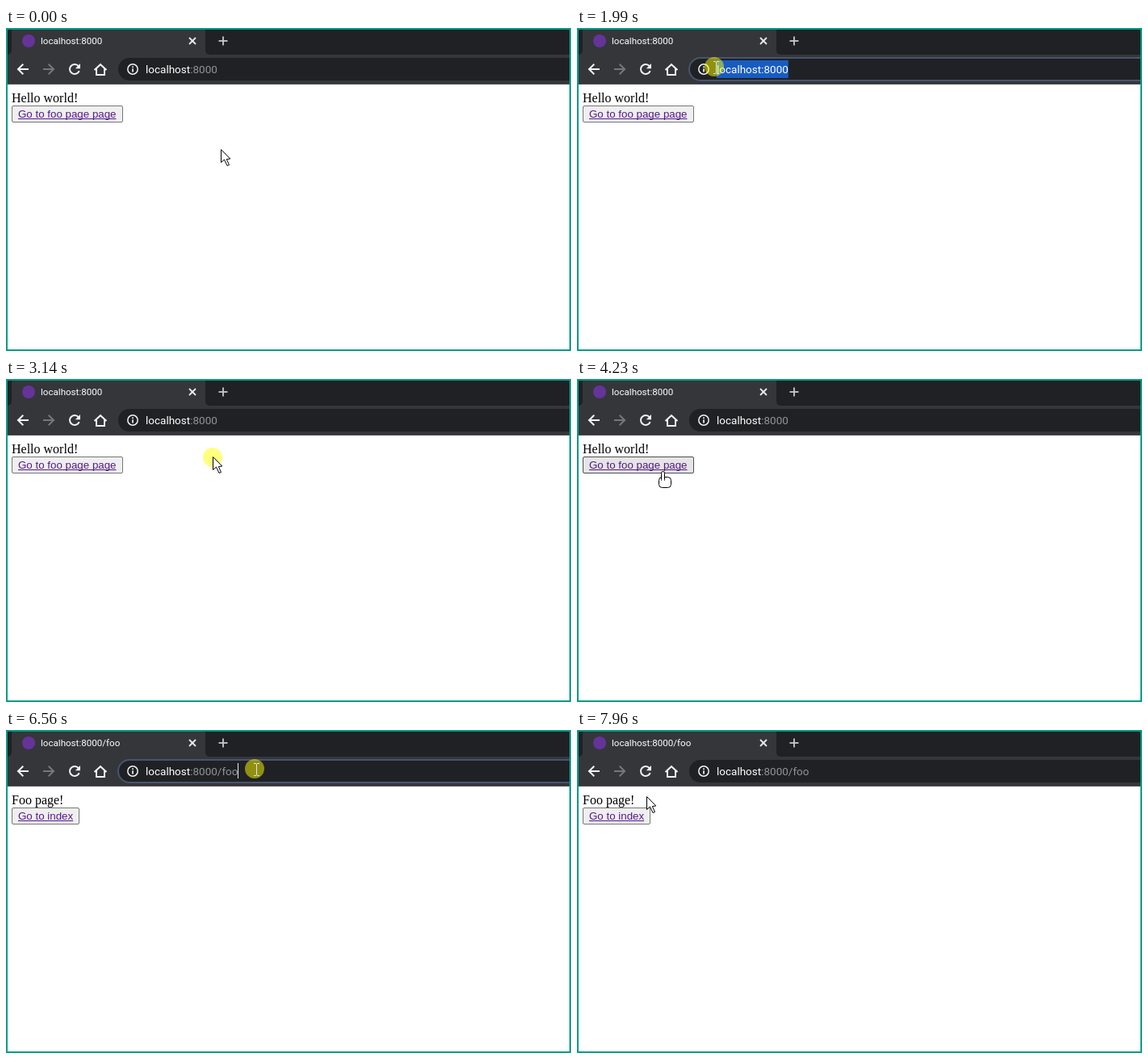
An HTML page with a canvas that plays this animation: 700x400 px, repeating every 8000 ms.

```html
<!DOCTYPE html>
<html lang="en">
<head>
<meta charset="utf-8">
<title>Browser navigation</title>
<style>
  html, body { margin: 0; width: 100%; height: 100%; overflow: hidden; background: #fff; }
  canvas { display: block; }
</style>
</head>
<body>
<canvas id="stage" width="700" height="400"></canvas>
<script>
const ctx = document.getElementById('stage').getContext('2d');
const LOOP = 8000;
const TICK = 77;
const UI = 'Roboto, "Open Sans", sans-serif';
const URL_FONT = '13.5px ' + UI;
const URL_X = 173;
const HOST = 'localhost';
const LIGHT = '#f1f3f4';

// Each move eases from the previous stop; "via" bends the path
const startPoint = [266, 150];
const moves = [
  { start: 530, end: 1070, to: [279, 40] },
  { start: 1150, end: 1220, to: [288, 53] },
  { start: 1370, end: 1760, to: [172, 49] },
  { start: 2140, end: 2290, to: [120, 49] },
  { start: 2370, end: 2910, to: [256, 96], via: [390, 45] },
  { start: 3370, end: 3600, to: [85, 73] },
  { start: 3770, end: 4380, to: [120, 112], via: [60, 125] },
  { start: 4530, end: 4770, to: [110, 110] },
  { start: 5780, end: 6390, to: [310, 49], via: [170, 140] },
  { start: 6630, end: 6860, to: [129, 51] },
  { start: 7030, end: 7560, to: [98, 81], via: [60, 118] },
  { start: 7880, end: 7960, to: [86, 82] }
];
const presses = [[1370, 2370], [3140, 3220], [5000, 5150], [6560, 7030], [7730, 7810]];
const focuses = [[1370, 3140], [6560, 7730]];
const PAGE_CHANGE = 5150;

const within = (ranges, t) => ranges.some(([a, b]) => t >= a && t < b);
const inBox = (p, x, y, w, h) => p.x >= x && p.x < x + w && p.y >= y && p.y < y + h;
const ease = u => u * u * (3 - 2 * u);

function cursorAt(t) {
  const started = moves.filter(m => m.start <= t);
  if (!started.length) return { x: startPoint[0], y: startPoint[1] };
  const { start, end, to, via } = started.pop();
  const from = started.length ? started.pop().to : startPoint;
  const steps = Math.round((end - start) / TICK) + 1;
  const step = Math.floor((t - start + 5) / TICK) + 1;
  const u = ease(Math.min(1, step / steps));
  const [x, y] = [0, 1].map(k => {
    const bend = via ? via[k] : (from[k] + to[k]) / 2;
    return Math.round((1 - u) ** 2 * from[k] + 2 * u * (1 - u) * bend + u * u * to[k]);
  });
  return { x, y };
}

function rect(x, y, w, h, color) {
  ctx.fillStyle = color;
  ctx.fillRect(x, y, w, h);
}

function circle(x, y, r, color) {
  ctx.fillStyle = color;
  ctx.beginPath();
  ctx.arc(x, y, r, 0, Math.PI * 2);
  ctx.fill();
}

function ring(x, y, r, width, turn = [0, Math.PI * 2]) {
  ctx.strokeStyle = LIGHT;
  ctx.lineWidth = width;
  ctx.beginPath();
  ctx.arc(x, y, r, ...turn);
  ctx.stroke();
}

function trace(points, close) {
  ctx.beginPath();
  points.forEach(([x, y]) => ctx.lineTo(x, y));
  if (close) ctx.closePath();
}

function line(color, width, ...points) {
  trace(points);
  ctx.strokeStyle = color;
  ctx.lineWidth = width;
  ctx.stroke();
}

function box(x, y, w, h, r, fill, border, width) {
  ctx.beginPath();
  ctx.roundRect(x, y, w, h, r);
  ctx.fillStyle = fill;
  ctx.fill();
  if (!border) return;
  ctx.strokeStyle = border;
  ctx.lineWidth = width;
  ctx.stroke();
}

function text(str, x, y, font, color) {
  ctx.font = font;
  ctx.fillStyle = color;
  ctx.fillText(str, x, y);
}

function textWidth(str, font) {
  ctx.font = font;
  return ctx.measureText(str).width;
}

function navArrow(x, dir, color) {
  line(color, 2, [x - 6.5 * dir, 51], [x + 7 * dir, 51]);
  line(color, 2, [x + .3 * dir, 44.7], [x - 6 * dir, 51], [x + .3 * dir, 57.3]);
}

function drawTabs(address) {
  rect(0, 0, 700, 33, '#202124');
  rect(0, 33, 700, 37, '#35363a');
  rect(0, 69, 700, 1, '#505154');
  // The tab flares outwards where it meets the toolbar
  rect(2, 28, 250, 5, '#35363a');
  circle(2, 28, 5, '#202124');
  circle(252, 28, 5, '#202124');
  rect(7, 0, 240, 33, '#35363a');
  circle(28, 16, 8, '#663399');
  text(address, 43, 20, '11.6px ' + UI, '#fff');
  line('#e8eaed', 1.8, [227, 12], [235, 20]);
  line('#e8eaed', 1.8, [235, 12], [227, 20]);
  line('#c8c9cc', 1.8, [263.5, 16], [274.5, 16]);
  line('#c8c9cc', 1.8, [269, 10.5], [269, 21.5]);
}

function drawNav(cursor, pressed) {
  for (const x of [85, 117]) {
    if (!pressed && inBox(cursor, x - 14, 37, 28, 28)) circle(x, 51, 13, '#45464a');
  }
  navArrow(21, 1, LIGHT);
  navArrow(53, -1, '#76777a');
  ring(85, 51, 6, 2, [.35, Math.PI * 1.78]);
  trace([[92, 44], [92, 50.2], [85.8, 50.2]], true);
  ctx.fillStyle = LIGHT;
  ctx.fill();
  line(LIGHT, 2, [109.5, 52], [117, 45.2], [124.5, 52]);
  line(LIGHT, 2, [112, 50], [112, 58], [122, 58], [122, 50]);
}

function drawAddress(address, cursor, focused, pressed) {
  const hover = !focused && inBox(cursor, 139, 36, 560, 30);
  box(139, 37, 600, 28, 14, hover ? '#242528' : '#202124', focused && '#47546f', 2);
  ring(157, 51, 6.2, 1.5);
  rect(156.2, 47.4, 1.7, 1.7, LIGHT);
  rect(156.2, 50.3, 1.7, 4.2, LIGHT);

  const edge = n => URL_X + textWidth(address.slice(0, n), URL_FONT);
  const end = edge(address.length);
  text(HOST, URL_X, 56, URL_FONT, '#fff');
  text(address.slice(HOST.length), edge(HOST.length), 56, URL_FONT, '#929498');
  if (!focused) return;

  let first = 0;
  if (pressed) {
    while (first < address.length && (edge(first) + edge(first + 1)) / 2 < cursor.x) first++;
  }
  if (first === address.length) {
    rect(Math.round(end), 41, 1, 19, '#e8eaed');
    return;
  }
  const left = edge(first);
  rect(left, 40, end - left, 22, '#185cc2');
  text(address.slice(first), left, 56, URL_FONT, '#fff');
}

function drawPage(heading, label, width, cursor, pressed) {
  rect(0, 70, 700, 330, '#fff');
  text(heading, 7, 92, '16px "Liberation Serif", serif', '#000');
  const hover = inBox(cursor, 7, 96, width, 21);
  const [fill, border] = !hover ? ['#efefef', '#767676']
    : pressed ? ['#f5f5f5', '#8d8d8d'] : ['#e5e5e5', '#4f4f4f'];
  box(7.5, 96.5, width - 1, 20, 1.5, fill, border, 1);
  const font = '13.333px "Liberation Sans", sans-serif';
  text(label, 15, 111, font, '#551a8b');
  rect(15, 112, textWidth(label, font), 1, '#551a8b');
}

const pointers = {
  arrow() {
    trace([[0, 0], [0, 16], [4, 12.5], [7.5, 20], [10, 19], [6.8, 12], [11.3, 11.5]], true);
    ctx.fillStyle = '#fff';
    ctx.fill();
    ctx.strokeStyle = '#000';
    ctx.lineWidth = 1;
    ctx.stroke();
  },
  hand() {
    box(-5, 7, 15, 13, 4, '#fff', '#000', 1);
    box(-2, 0, 4, 12, 2, '#fff', '#000', 1);
    rect(-1.5, 8, 3, 5, '#fff');
  },
  beam() {
    const color = '#e4e4e4';
    line(color, 1, [0, -7.5], [0, 6.5]);
    for (const y of [-8, 7]) {
      line(color, 1, [-3.5, y], [-.5, y]);
      line(color, 1, [.5, y], [3.5, y]);
    }
  }
};
const glowOffset = { arrow: [0, 1], hand: [0, 0], beam: [-2, -1] };

function drawCursor({ x, y }, kind, pressed) {
  const [dx, dy] = glowOffset[kind];
  if (pressed) circle(x + dx, y + dy, 12, 'rgba(255,255,0,.5)');
  ctx.save();
  ctx.translate(x + .5, y + .5);
  pointers[kind]();
  ctx.restore();
}

function draw(t) {
  const foo = t >= PAGE_CHANGE;
  const address = HOST + (foo ? ':8000/foo' : ':8000');
  const cursor = cursorAt(t);
  const pressed = within(presses, t);
  const focused = within(focuses, t);
  const buttonWidth = foo ? 84 : 138;

  drawTabs(address);
  drawNav(cursor, pressed);
  drawAddress(address, cursor, focused, pressed);
  drawPage(foo ? 'Foo page!' : 'Hello world!', foo ? 'Go to index' : 'Go to foo page page',
    buttonWidth, cursor, pressed);

  const dragging = pressed && focused;
  const kind = dragging || inBox(cursor, 139, 36, 560, 30) ? 'beam'
    : inBox(cursor, 15, 98, buttonWidth - 16, 17) ? 'hand' : 'arrow';
  drawCursor(cursor, kind, pressed);

  ctx.strokeStyle = '#009e88';
  ctx.lineWidth = 2;
  ctx.strokeRect(1, 1, 698, 398);
}

const began = performance.now();
function tick() {
  draw((performance.now() - began) % LOOP);
  requestAnimationFrame(tick);
}
tick();
</script>
</body>
</html>
```
